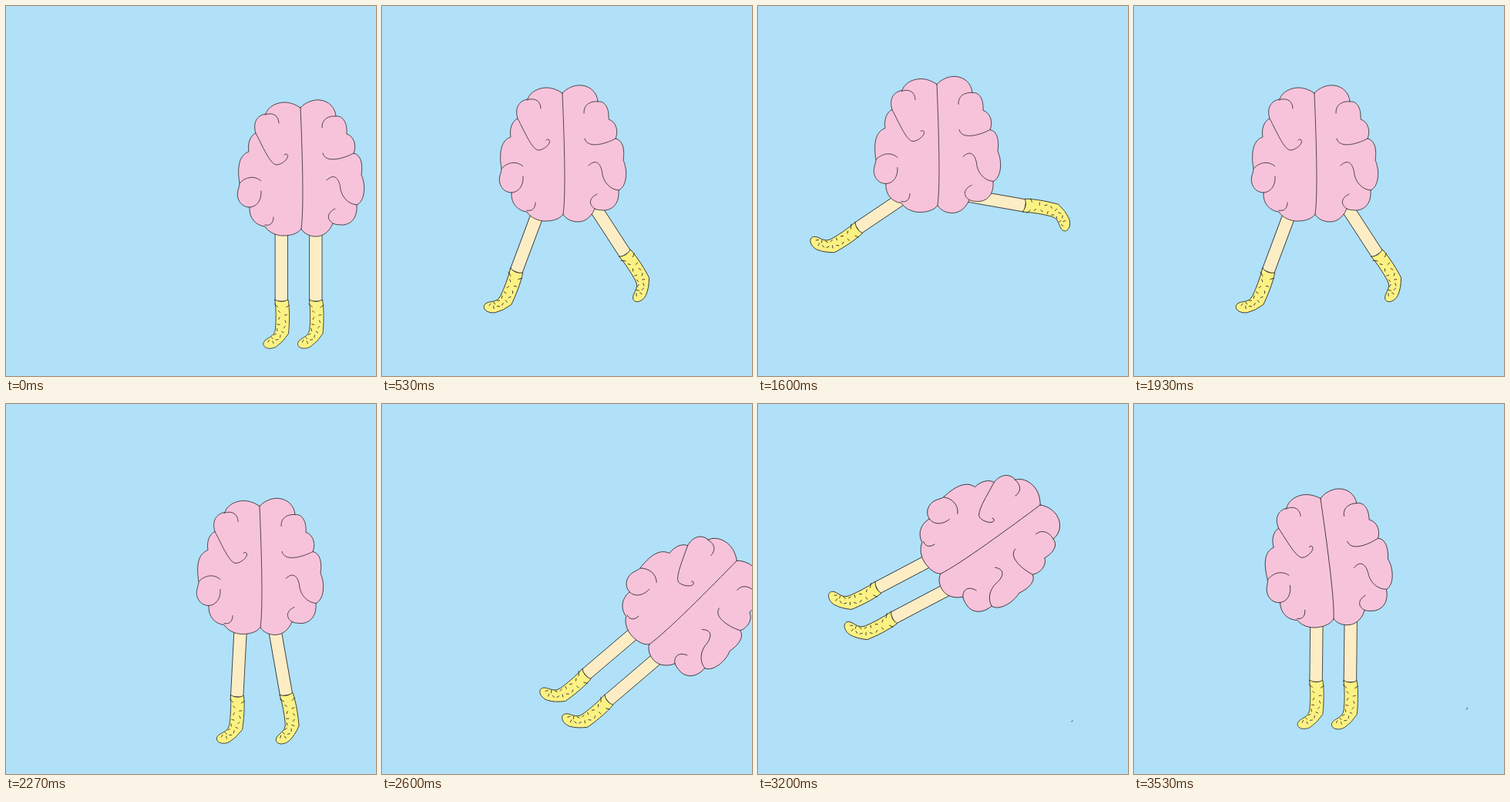
Animation of 480 by 480 pixels, one loop 3.74 s. Source, as an HTML page with a canvas:

```html
<!DOCTYPE html>
<html lang="en">
<head>
<meta charset="utf-8">
<title>Jumping brain</title>
<style>
html, body { margin: 0; width: 100%; height: 100%; overflow: hidden; background: #b0e1f8; }
canvas { display: block; }
</style>
</head>
<body>
<canvas id="stage" width="480" height="480"></canvas>
<script>
const ctx = document.getElementById('stage').getContext('2d');
const LOOP = 3740, STEP = 133.33;
const INK = '#2b2526', SKY = '#b0e1f8', PINK = '#f7c3db', SKIN = '#fdedc5', YELLOW = '#fcf283';
const CX = 383, CY = 210.5, SHIN = 80;

// Brain drawn around (CX, CY)
const brain = new Path2D(`M382 132
  C388 125 399 121 407 122 C418 123 427 131 428 143
  C438 142 443 153 442 166 C452 169 455 182 451 191
  C461 193 463 206 461 219 C467 232 466 253 455 258
  C456 271 451 282 438 284 C433 284 428 284 424 282
  C420 292 412 299 402 299 C394 299 386 295 383 289
  C379 295 370 298 360 298 C350 298 340 293 336 286
  C325 285 315 276 316 261 C305 261 298 250 301 239
  C302 235 303 233 303 230 C300 212 301 194 315 189
  C313 178 317 168 324 165 C320 152 325 142 337 140
  C340 130 352 125 361 125 C369 125 376 128 382 132Z`);
const folds = new Path2D(`M382 132 C384 180 387 262 383 289
  M336 141 C347 137 354 143 354 152
  M324 165 C333 182 343 206 351 206 C358 206 368 197 365 193 Q364 191 361 193
  M303 230 C310 222 322 219 331 227
  M316 261 C325 261 332 252 331 240
  M336 284 C343 286 347 281 347 274
  M428 143 C420 142 409 146 410 158
  M451 191 C436 199 414 204 411 191
  M455 258 C443 257 436 247 434 238 C433 226 427 215 416 226
  M424 282 C416 277 416 268 427 263`);

// Leg hangs from the hip, sock from the ankle
const leg = new Path2D(`M-8 -15 H8 V${SHIN} H-8Z`);
const sock = new Path2D(`M-8.5 -2 Q0 3 8.5 -2
  C11 12 10 32 9 42 Q2 53 -7 59 C-16 64 -26 60 -23 53
  C-20 47 -9 47 -8 36 C-7 24 -7 12 -8.5 -2Z`);

const mix = (a, b, u) => a.map((v, i) => v + (b[i] - v) * u);

// Pose: brain x, y, tilt, then hip x, hip y, angle for each leg
const stand = [383, 210.5, 0, -25.5, 92.5, 0, 19, 92.5, 0];
const step = [330, 211, 0, -26, 89, 3, 20, 88, -10];
const wide = [235, 191.5, 0, -33, 78.5, 20.5, 37.5, 63.5, -33];
const lift = [233, 180, 0, -37.5, 64, 56, 35, 65, -80];
const split = [232, 132, 0, -33, 70.5, 87, 33, 72, -91.6];
const stiff = (x, y, tilt) => [x, y, tilt, -22, 78, 6.5, 22, 83, 6.5];
const dive = stiff(430, 395, 105);
const kick = stiff(395, 285, 145);
const flipped = stiff(352.7, 251.5, 117.4);
const land = stiff(251, 200.5, -5.9);

// Moves from a to b over a hop of the given height
function leap(a, b, u, height, ease = 1) {
  const pose = mix(a, b, u ** ease);
  pose[1] -= height * Math.sin(Math.PI * u);
  return pose;
}

const approach = [step, mix(step, wide, 0.5), wide];
const jump = [mix(wide, lift, 0.5), lift, mix(lift, split, 0.5)];
const fall = [1 / 3, 2 / 3, 1].map(u => leap(stand, dive, u, 40, 2));
const swing = [0, 0.25, 0.5, 0.75, 1].map(u => leap(flipped, land, u, 50));
const poses = [stand, stand, ...approach, ...jump, split, split, split,
  ...jump.reverse(), wide, ...approach.slice().reverse(), ...fall, kick, ...swing, land];

function at(x, y, deg, draw) {
  ctx.save();
  ctx.translate(x, y);
  ctx.rotate(deg * Math.PI / 180);
  draw();
  ctx.restore();
}

function shape(path, fill) {
  ctx.fillStyle = fill;
  ctx.fill(path);
  ctx.stroke(path);
}

function dash(x, y, angle, len) {
  const dx = Math.cos(angle) * len / 2, dy = Math.sin(angle) * len / 2;
  ctx.beginPath();
  ctx.moveTo(x - dx, y - dy);
  ctx.lineTo(x + dx, y + dy);
  ctx.stroke();
}

// Hairs alternate left and right along the curve of the foot
function drawHairs() {
  dash(-7, 5.5, 0.7, 6);
  dash(8, 6.5, -0.6, 5);
  for (let i = 0; i < 14; i++) {
    const t = (i + 1.5) / 15, side = i % 2 ? 4.5 : -4;
    const x = 10 * t * (1 - t) - 17 * t * t + side;
    const y = 6 + 76 * t * (1 - t) + 48 * t * t;
    dash(x, y, i * 2.2 + 0.8, 3.2);
  }
}

function drawLeg(x, y, deg) {
  at(x, y, deg, () => {
    shape(leg, SKIN);
    ctx.translate(0, SHIN);
    shape(sock, YELLOW);
    drawHairs();
  });
}

function drawBody([x, y, tilt, ...legs]) {
  at(x, y, tilt, () => {
    drawLeg(...legs.slice(0, 3));
    drawLeg(...legs.slice(3));
    ctx.translate(-CX, -CY);
    shape(brain, PINK);
    ctx.stroke(folds);
  });
}

function frame(now) {
  const n = Math.min(poses.length - 1, Math.floor((now % LOOP + 5) / STEP));
  ctx.fillStyle = SKY;
  ctx.fillRect(0, 0, 480, 480);
  ctx.strokeStyle = INK;
  ctx.lineWidth = 0.8;
  ctx.lineCap = ctx.lineJoin = 'round';
  drawBody(poses[n]);
  // loose hair
  if (n > 25) dash(432, 395, 1.9, 2);
  else if (n > 21) dash(407.5, 411.5, 2.2, 2);
}

const start = performance.now();
function tick() {
  frame(performance.now() - start);
  requestAnimationFrame(tick);
}
tick();
</script>
</body>
</html>
```
